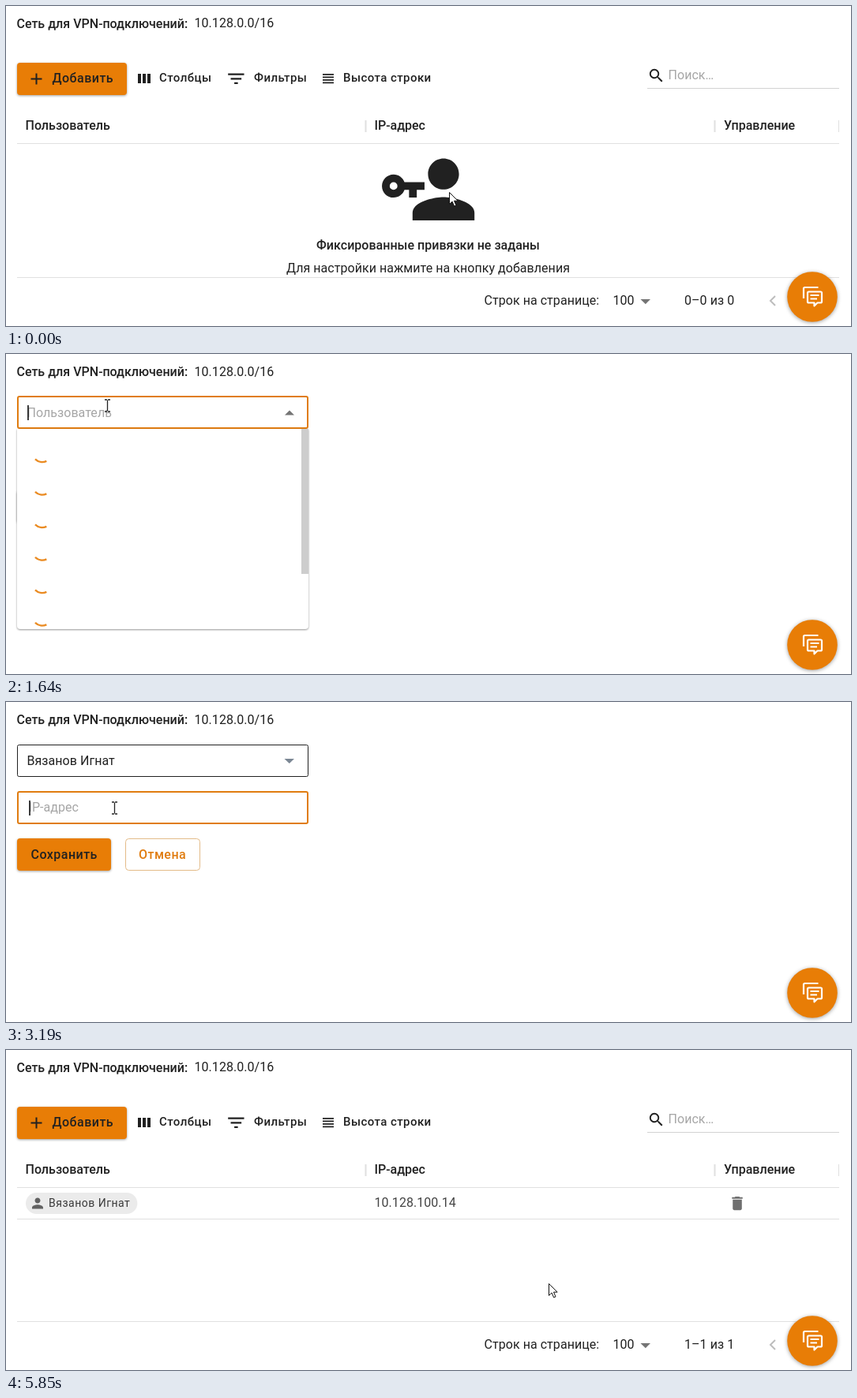
An HTML page that plays this animation: 1070x406 px, repeating every 6.44 s.

```html
<!DOCTYPE html>
<html lang="ru">
<head>
<meta charset="utf-8">
<title>VPN</title>
<style>
html, body { margin: 0; width: 100%; height: 100%; overflow: hidden; background: #fff; }
svg { display: block; width: 100vw; height: 100vh; }
text { font: 400 16px Roboto, Arial, sans-serif; letter-spacing: .05px; fill: #212121; white-space: pre; }
.m { font-weight: 500; letter-spacing: 0; }
.btn { font-weight: 500; letter-spacing: .46px; }
.tool { font-weight: 500; font-size: 15px; letter-spacing: .43px; }
.chip { font-size: 14px; letter-spacing: .5px; fill: #3a3a3a; }
.hint { fill: #a6a6a6; }
.tip { font-weight: 500; font-size: 13px; fill: #fff; text-anchor: middle; }
.mid { text-anchor: middle; }
.fab { filter: drop-shadow(0 1.5px 2.5px rgba(0,0,0,.38)); }
.menu { filter: drop-shadow(0 1px 1px rgba(0,0,0,.42)); }
</style>
</head>
<body>
<svg id="stage" viewBox="0 0 1070 406" xmlns="http://www.w3.org/2000/svg"></svg>
<script>
const LOOP = 6440;
const ORANGE = [232, 125, 6], DARK = [162, 87, 6];
const INK = '#212121', LINE = '#e0e0e0';

// Moments of the scenario, in ms
const FORM = 810, OPEN = 1423, LOADED = 1900, PICK = 2450, FOCUS_IP = 3190, PASTE = 4110, SAVED = 5000;

const people = ['Ромин Глеб', 'Кленакова Валентина', 'Вязанов Игнат',
  'Дымарикова Полина', 'Тихомшаный Кирилл', 'Лутнев Олег'];
const chosen = people[2];
const address = '10.128.100.14', addressX = 29;

const icons = {
  person: 'M12 12c2.21 0 4-1.79 4-4s-1.79-4-4-4-4 1.79-4 4 1.79 4 4 4zm0 2c-2.67 0-8 1.34-8 4v2h16v-2c0-2.66-5.33-4-8-4z',
  key: 'M12.65 10C11.83 7.67 9.61 6 7 6c-3.31 0-6 2.69-6 6s2.69 6 6 6c2.61 0 4.83-1.67 5.65-4H15v4h4v-4h4v-4zM7 14a2 2 0 1 1 0-4 2 2 0 0 1 0 4z',
  filter: 'M10 18h4v-2h-4zM3 6v2h18V6zm3 7h12v-2H6z',
  rows: 'M4 15h16v-2H4zm0 4h16v-2H4zm0-8h16V9H4zm0-6v2h16V5z',
  search: 'M15.5 14h-.79l-.28-.27A6.5 6.5 0 1 0 13.73 14.43l.27.28v.79l5 4.99L20.49 19zm-6 0a4.5 4.5 0 1 1 0-9 4.5 4.5 0 0 1 0 9z',
  trash: 'M6 19c0 1.1.9 2 2 2h8c1.1 0 2-.9 2-2V7H6zM19 4h-3.5l-1-1h-5l-1 1H5v2h14z'
};

const icon = (name, x, y, scale, fill = INK) =>
  `<path d="${icons[name]}" fill="${fill}" fill-rule="evenodd" transform="translate(${x} ${y}) scale(${scale})"/>`;
const text = (x, y, s, cls = '', extra = '') => `<text x="${x}" y="${y}" class="${cls}" ${extra}>${s}</text>`;
const rect = (x, y, w, h, fill, extra = '') =>
  `<rect x="${x}" y="${y}" width="${w}" height="${h}" fill="${fill}" ${extra}/>`;
const group = (id, body, extra = '') => `<g id="${id}" ${extra}>${body}</g>`;
const chip = (x, cy, name, bg = '#ebebeb') => `<g class="person">
  ${rect(x, cy - 13.5, 100, 27, bg, 'rx="13.5"')}
  ${icon('person', x + 4.5, cy - 10.5, .875, '#616161')}
  ${text(x + 29, cy + 4.5, name, 'chip')}</g>`;

const emptyState = icon('key', 473.6, 199, 2.45) + icon('person', 495.2, 174, 4.9) +
  text(534.5, 309, 'Фиксированные привязки не заданы', 'm mid') +
  text(534.5, 338, 'Для настройки нажмите на кнопку добавления', 'mid') +
  text(859, 379, '0–0 из 0');

const filledState = chip(25, 194.5, chosen) + text(466.5, 199, address, '', 'style="fill:#444"') +
  icon('trash', 914.5, 183, .96, '#6f6f6f') + rect(14, 214, 1041, 1, LINE) +
  text(859, 379, '1–1 из 1');

const table =
  text(238.5, 27, '10.128.0.0/16') +
  rect(14, 72, 139, 41, '', 'id="add" rx="4"') +
  `<path d="M31.5 92.5h14m-7-7v14" stroke="${INK}" stroke-width="2"/>` +
  text(58.5, 97, 'Добавить', 'btn') +
  [167, 173, 179].map(x => rect(x, 86, 4, 12, INK)).join('') + text(194, 96, 'Столбцы', 'tool') +
  icon('filter', 277.8, 78.7, 1.13) + text(314, 96, 'Фильтры', 'tool') +
  icon('rows', 397.5, 81.5, .875) + text(427, 96, 'Высота строки', 'tool') +
  icon('search', 812, 77, .95) + text(838.5, 93, 'Поиск…', 'hint') + rect(812, 104, 243, 1, '#d2d2d2') +
  text(24.5, 157, 'Пользователь', 'm') + text(466.5, 157, 'IP-адрес', 'm') + text(909, 157, 'Управление', 'm') +
  [[454.5, 2], [896.5, 2], [1054, 1]].map(([x, w]) => rect(x, 145, w, 15, LINE)).join('') +
  rect(14, 174, 1041, 1, LINE) + rect(14, 344, 1041, 1, LINE) +
  text(605.5, 379, 'Строк на странице:') + text(768.5, 379, '100') +
  '<path d="M803.5 372h12.5l-6.2 6.3z" fill="#757575"/>' +
  '<path d="M974 368l-6 6 6 6" fill="none" stroke="#bdbdbd" stroke-width="2"/>' +
  group('empty', emptyState) + group('filled', filledState) +
  group('tip', rect(45, 129, 76, 28, '#616161', 'rx="4" opacity=".92"') + text(83, 147, 'Добавить', 'tip'));

const form =
  text(238.5, 28, '10.128.0.0/16') +
  '<rect id="userBox" rx="2" fill="none"/><rect id="ipBox" rx="2" fill="none"/>' +
  text(26.5, 80, 'Пользователь', 'hint', 'id="userHint"') + text(26.5, 80, chosen, '', 'id="user"') +
  '<path id="arrow"/>' +
  text(28.5, 139, 'IP-адрес', 'hint', 'id="ipHint"') + text(addressX, 139, address, '', 'id="ip"') +
  rect(14, 173, 119, 41, '', 'id="save" rx="4"') + text(31.5, 199, 'Сохранить', 'btn') +
  rect(151.5, 173.5, 94, 40, 'none', 'rx="4" stroke="#e3bb88"') +
  text(168, 199, 'Отмена', 'btn', 'style="fill:#e07c10"');

const spinner = i => `<circle class="spin" r="20.2" fill="none" stroke="#ea8b22" stroke-width="3.8"
  data-y="${124 + i * 41.5}"/>`;
const menu =
  '<path class="menu" d="M14 95h369v250a4 4 0 0 1-4 4h-361a4 4 0 0 1-4-4z" fill="#fff"/>' +
  rect(374, 95, 9, 184, '#cdcdcd', 'id="bar"') +
  group('spinners', people.map((_, i) => spinner(i)).join(''), 'clip-path="url(#menuClip)"') +
  group('list', rect(14, 185, 360, 41, '#f4f4f4', 'id="hoverRow"') +
    people.map((name, i) => chip(32, 124 + i * 40.5, name, i === 2 ? '#e4e4e4' : '#ebebeb')).join(''));

const fab = '<circle class="fab" cx="1021" cy="369" r="31.8" fill="rgb(232,125,6)"/>' +
  `<g fill="none" stroke="#fff" stroke-width="2.2" stroke-linejoin="round">
    <path d="M1010 371v-12.5q0-1.5 1.5-1.5h17"/>
    <path d="M1016.5 362.5h15q1.5 0 1.5 1.5v11q0 1.5-1.5 1.5h-4l-4 4v-4h-7q-1.5 0-1.5-1.5v-11q0-1.5 1.5-1.5z"/>
    <path d="M1018.5 367h11m-11 4.5h8.5" stroke-width="2"/></g>`;

const pointers =
  group('arrowCur', '<path d="M.5.5v15l3.6-3.4 2.5 5.9 2.4-1-2.5-5.8h4.6z" fill="#fff" stroke="#111"/>') +
  group('handCur', `<g transform="translate(-7.6 -.3)" stroke="#111" stroke-width="1.2" stroke-linejoin="round">
    <path fill="#fff" d="M5 15V2.2Q5 .7 6.6 .7T8.2 2.2V8.2Q9.8 7.2 11.2 8.6 12.8 7.7 14 9.3 16.8 8.8 16.8 11.5V15Q16.8 18 15 20V23H7.5V20.5L1.2 13.6Q.6 12 2 11.4 3.4 11.2 5 14Z"/>
    <path d="M8.2 8v4m3-3.5V12m2.8-2.7V12" fill="none"/></g>`) +
  group('beamCur', '<path d="M-3.5-7.5h3m1 0h3M0-7V7M-3.5 7.5h3m1 0h3" fill="none" stroke="#222" stroke-width="1.3"/>');

document.getElementById('stage').innerHTML =
  `<clipPath id="menuClip">${rect(14, 95, 360, 253, '#000')}</clipPath>` +
  rect(0, 0, 1070, 406, '#fff') + text(13.5, 28, 'Сеть для VPN-подключений:', 'm') +
  group('table', table) + group('form', form) + group('menu', menu) +
  rect(0, 0, 1.6, 19, '#111', 'id="caret"') + fab +
  rect(-2, 404.5, 127, 12, '#f3f3f3', 'id="status" rx="3" stroke="#cfcfcf"') +
  group('pointer', pointers);

const $ = {};
document.querySelectorAll('[id]').forEach(el => $[el.id] = el);
const spins = [...document.querySelectorAll('.spin')];

// Chips are as wide as their names
document.querySelectorAll('.person').forEach(g => {
  const w = g.querySelector('text').getComputedTextLength();
  g.querySelector('rect').setAttribute('width', w + 38);
});
const addressWidth = $.ip.getComputedTextLength();

const set = (el, attrs) => { for (const k in attrs) el.setAttribute(k, attrs[k]); };
const show = (id, on) => { $[id].style.display = on ? '' : 'none'; };
const clamp = v => Math.min(1, Math.max(0, v));
const smooth = v => { v = clamp(v); return v * v * (3 - 2 * v); };
const cubic = v => v < .5 ? 4 * v ** 3 : 1 - 4 * (1 - v) ** 3;
const within = (t, a, b) => t >= a && t < b;

const start = [561, 236];
const moves = [ // from, to, x, y
  [60, 520, 135, 103.5], [1150, 1330, 128.5, 65.5], [1900, 2140, 151, 190.5],
  [2630, 2800, 137.5, 134.5], [4150, 4570, 83.5, 184.5], [5500, 5850, 687, 296]
];

function pointerAt(t) {
  let [x, y] = start;
  for (const [a, b, nx, ny] of moves) {
    const k = cubic(clamp((t - a) / (b - a)));
    x += (nx - x) * k;
    y += (ny - y) * k;
  }
  return [x, y];
}

function pointerShape(t, x, y) {
  const inX = (a, b) => x >= a && x <= b;
  const inY = (a, b) => y >= a && y <= b;
  if (!within(t, FORM, SAVED)) return inX(14, 153) && inY(72, 113) ? 'hand' : 'arrow';
  if (within(t, OPEN, PICK) && y > 103) return 'hand';
  if (inX(14, 383) && (inY(53, 95) || inY(113, 155))) return 'beam';
  if (inY(173, 214) && (inX(14, 133) || inX(150.5, 246))) return 'hand';
  return 'arrow';
}

// Hovered buttons get darker and rise
function drawButton(el, k) {
  set(el, { fill: `rgb(${ORANGE.map((c, i) => Math.round(c + (DARK[i] - c) * k))})` });
  el.style.filter = `drop-shadow(0 ${1.5 + k}px ${1.5 + k}px rgba(0,0,0,.36))`;
}

function drawBox(el, y, focused) {
  const d = focused ? 1 : .5;
  set(el, {
    x: 14 + d, y: y + (focused ? 1 : 1.5), width: 369 - 2 * d, height: 40,
    stroke: focused ? '#e07c10' : INK, 'stroke-width': 2 * d
  });
}

function drawSpinners(t) {
  const p = (t - OPEN) / 1400 % 1;
  const e = smooth(p < .5 ? p * 2 : p * 2 - 1);
  const length = p < .5 ? 1 + 99 * e : 100;
  const shift = p < .5 ? 15 * e : 15 + 110 * e;
  for (const c of spins) set(c, {
    transform: `translate(46 ${c.dataset.y}) scale(.64) rotate(${p * 360})`,
    'stroke-dasharray': `${length} 200`, 'stroke-dashoffset': -shift
  });
}

function drawCaret(t) {
  const user = within(t, OPEN, LOADED);
  const ip = within(t, FOCUS_IP, 3650) || within(t, PASTE, 4730);
  show('caret', user || ip);
  const x = user ? 27.2 : t < PASTE ? 29.2 : addressX + addressWidth - .6;
  set($.caret, { x, y: user ? 65 : 125 });
}

function render(t) {
  const inForm = within(t, FORM, SAVED), open = within(t, OPEN, PICK), loaded = t >= LOADED;
  show('table', !inForm);
  show('form', inForm);
  show('menu', open);
  show('empty', t < FORM);
  show('filled', t >= SAVED);
  show('status', within(t, 750, 1230) || within(t, SAVED, 5430));

  const tip = t < FORM ? smooth((t - 590) / 140) : 0;
  show('tip', tip > 0);
  set($.tip, { opacity: tip });
  drawButton($.add, t < FORM ? smooth((t - 440) / 250) : 0);
  drawButton($.save, smooth((t - 4480) / 250));

  drawBox($.userBox, 53, within(t, 1390, LOADED));
  drawBox($.ipBox, 113, t >= FOCUS_IP);
  show('userHint', t < PICK);
  show('user', t >= PICK);
  show('ipHint', t < PASTE);
  show('ip', t >= PASTE);
  set($.arrow, open
    ? { d: 'M353 77.5h12l-6-6z', fill: '#757575' }
    : { d: 'M352.5 72h12.5l-6.2 6z', fill: '#7b8794' });

  show('spinners', !loaded);
  show('list', loaded);
  set($.bar, { height: loaded ? 189 : 184 });
  if (open && !loaded) drawSpinners(t);
  drawCaret(t);

  const [x, y] = pointerAt(t), shape = pointerShape(t, x, y);
  show('hoverRow', y > 185);
  for (const s of ['arrow', 'hand', 'beam']) show(s + 'Cur', s === shape);
  set($.pointer, { transform: `translate(${x} ${y})` });
}

const t0 = performance.now();
function tick() {
  render((performance.now() - t0) % LOOP);
  requestAnimationFrame(tick);
}
tick();
</script>
</body>
</html>
```
